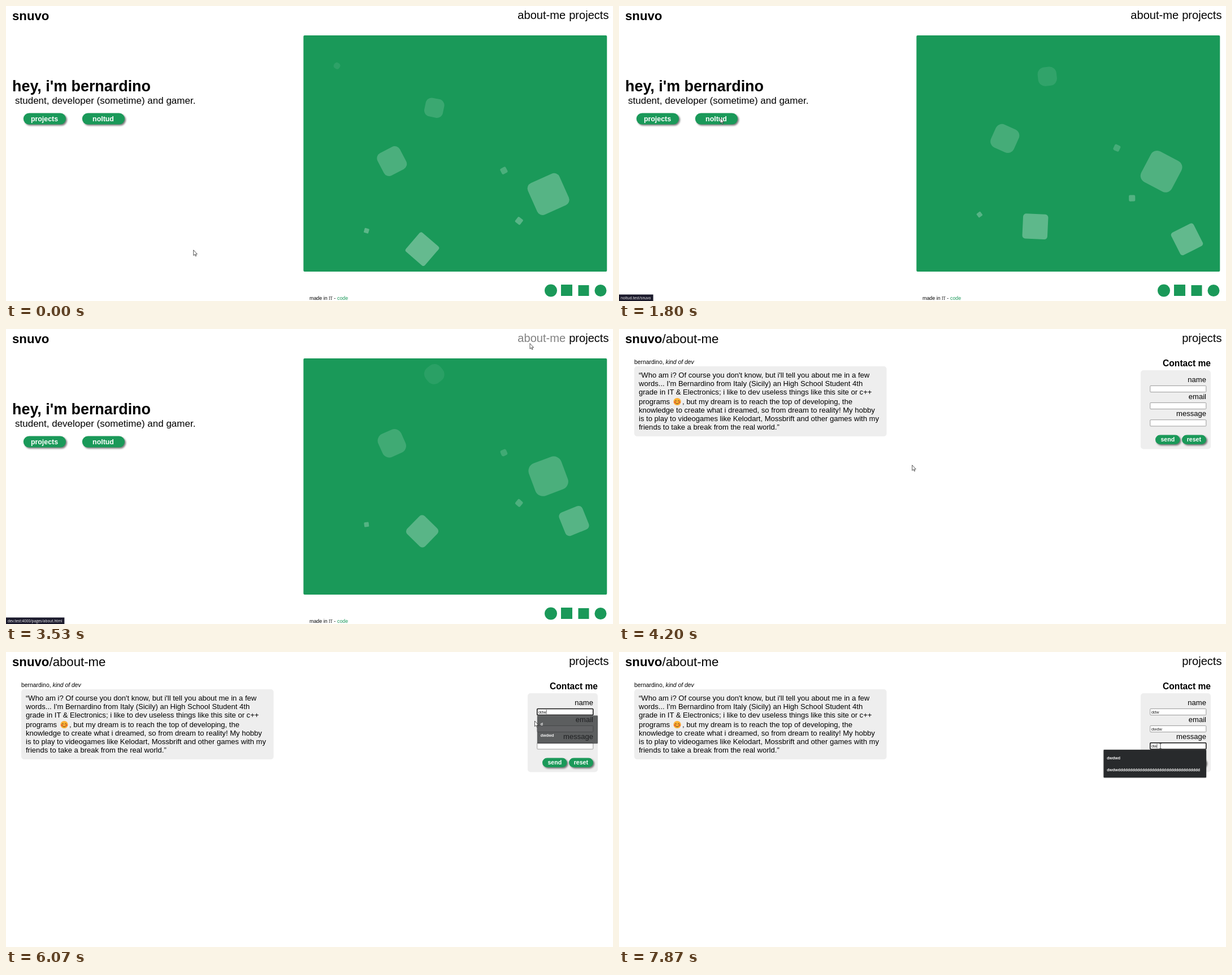
Write an HTML page that moves like this. It is 1074 px wide and 522 px high and loops after 8000 ms.

```html
<!DOCTYPE html>
<html lang="en">
<head>
<meta charset="utf-8">
<title>snuvo</title>
<style>
  html, body { margin: 0; width: 100%; height: 100%; overflow: hidden; background: #fff; }
  svg { display: block; }
  text { font-family: "Liberation Sans", Arial, sans-serif; }
  .b { font-weight: bold; }
  .end { text-anchor: end; }
  .nav { font-size: 20.1px; }
  .logo { font-size: 22.2px; }
  .body { font-size: 13.05px; }
  .foot { font-size: 8.9px; }
  .pill rect { fill: #1a9959; filter: drop-shadow(2.8px 2.8px 1.6px #0008); }
  .pill text { fill: #fff; font-weight: bold; text-anchor: middle; }
  .green { fill: #1a9959; }
  .value { font-size: 7.4px; fill: #222; }
  .option { font-size: 7px; font-weight: bold; fill: #f2f2f2; }
  .status { font: 6.5px "Open Sans", sans-serif; fill: #fff; }
</style>
</head>
<body>
<svg width="1074" height="522" viewBox="0 0 1074 522">
  <text class="logo b" x="11" y="25">snuvo</text>
  <text class="nav end" x="1066.5" y="23">projects</text>

  <g id="home">
    <text id="aboutLink" class="nav" x="905.3" y="23">about-me</text>
    <text class="b" x="11" y="151" font-size="26.9">hey, i'm bernardino</text>
    <text x="16" y="173" font-size="17">student, developer (sometime) and gamer.</text>
    <g class="pill" font-size="12.4">
      <rect x="30.8" y="189.6" width="75.2" height="20" rx="10"/>
      <text x="68" y="204">projects</text>
      <rect x="134.8" y="189.6" width="75.2" height="20" rx="10"/>
      <text x="172" y="204">noltud</text>
    </g>
    <rect class="green" x="526.3" y="52" width="537" height="418" rx="2"/>
    <svg id="panel" x="526.3" y="52" width="537" height="418"></svg>
    <g class="green">
      <circle cx="964" cy="503.5" r="11"/>
      <rect x="982" y="493" width="20" height="20"/>
      <rect x="1012.5" y="494" width="19" height="19"/>
      <circle cx="1052" cy="503.5" r="10.5"/>
    </g>
    <text class="foot" x="537" y="519.5">made in</text>
    <text x="571" y="519.5" style="font: 7.2px 'Liberation Serif', serif">IT</text>
    <text class="foot" x="580.3" y="519.5">-</text>
    <text class="foot green" x="586" y="519.5">code</text>
    <g id="status">
      <rect id="statusBox" y="510.5" height="11.5" fill="#1b1a2c"/>
      <text id="statusText" class="status" x="3" y="518.6"></text>
    </g>
  </g>

  <g id="about">
    <text class="logo" x="76.5" y="25">/about-me</text>
    <text x="27" y="61.5" font-size="10.4">bernardino, <tspan font-style="italic">kind of dev</tspan></text>
    <rect x="27" y="66" width="446.5" height="124" rx="5" fill="#eee"/>
    <g class="body">
      <text x="35" y="85.5">“Who am i? Of course you don't know, but i'll tell you about me in a few</text>
      <text x="35" y="101">words... I'm Bernardino from Italy (Sicily) an High School Student 4th</text>
      <text x="35" y="116">grade in IT &amp; Electronics; i like to dev useless things like this site or c++</text>
      <text x="35" y="133">programs</text>
      <text x="112" y="133">, but my dream is to reach the top of developing, the</text>
      <text x="35" y="148">knowledge to create what i dreamed, so from dream to reality! My hobby</text>
      <text x="35" y="163">is to play to videogames like Kelodart, Mossbrift and other games with my</text>
      <text x="35" y="178">friends to take a break from the real world.”</text>
    </g>
    <g transform="translate(103 128.5)">
      <circle r="6.6" fill="#fbb034"/>
      <circle cx="-4.2" cy="1.2" r="1.7" fill="#f4692f"/>
      <circle cx="4.2" cy="1.2" r="1.7" fill="#f4692f"/>
      <path d="M-4-1q1.4-2.4 2.8 0M1.2-1q1.4-2.4 2.8 0M-3 2.2q3 3.4 6 0" fill="none" stroke="#5b3a1a" stroke-linecap="round"/>
    </g>

    <text class="b end" x="1047" y="66" font-size="15.6">Contact me</text>
    <rect x="923" y="73" width="124" height="139.5" rx="5" fill="#eee"/>
    <g class="body end">
      <text x="1039" y="93.5">name</text>
      <text x="1039" y="123.5">email</text>
      <text x="1039" y="153.5">message</text>
    </g>
    <g class="pill" font-size="10.6">
      <rect x="949" y="187.5" width="43.5" height="16.5" rx="8.25"/>
      <text x="970.8" y="199">send</text>
      <rect x="996" y="187.5" width="43" height="16.5" rx="8.25"/>
      <text x="1017.3" y="199">reset</text>
    </g>
    <g id="form"></g>
  </g>

  <path id="arrow" d="M0 0V9.6L2.2 7.7 3.7 10.9 5.1 10.3 3.7 7.2H6.6Z" fill="#fff" stroke="#111" stroke-width=".7"/>
  <path id="beam" d="M-2-4.5H2M0-4.5V4.5M-2 4.5H2" fill="none" stroke="#222" stroke-width=".8"/>
</svg>

<script>
const $ = id => document.getElementById(id);
const LOOP = 8000, SWITCH = 3670, SCALE = 0.556;

// left edge (share of panel), size, delay in s, duration in s
const squares = [
  [.25, 80, 0, 25], [.10, 20, 2, 12], [.70, 20, 4, 25],
  [.40, 60, 0, 18], [.65, 20, 0, 25], [.75, 110, 3, 25],
  [.35, 80, 7, 25], [.20, 15, 2, 35], [.85, 80, 0, 11]
];

// time, x, y of the pointer
const pointer = [
  [0, 332, 432], [870, 92, 276], [1200, 58.5, 254.5], [1400, 66, 200],
  [1750, 172, 199], [1950, 200, 195], [2470, 706, 67], [2600, 745, 58],
  [2980, 905, 24], [3270, 927, 25.5], [3600, 927, 25.5], [4200, 519, 241],
  [4300, 490, 222], [4530, 317, 120], [4800, 620, 52], [5000, 900, 72],
  [5130, 962, 105], [5700, 962, 105], [6000, 936, 121], [6070, 935.5, 122],
  [6200, 928.5, 128], [6400, 957, 136], [7050, 957, 136], [7230, 958, 166.5]
];

const statuses = [
  [1380, 1580, "dev.test:4000/pages/projects.html"],
  [1640, 2000, "noltud.test/snuvo"],
  [2990, SWITCH, "dev.test:4000/pages/about.html"]
];

const fields = [
  { y: 106, text: "ddw", keys: [5500, 5870, 6000], focus: 5100, blur: 6380,
    open: 5190, close: 6010, x: 940, w: 107,
    options: ["d", "dwdwd", "wdwd", "wd", "wdd", "w"] },
  { y: 136, text: "dwdw", keys: [6530, 6660, 6865, 6925], focus: 6380, blur: 7200,
    open: 6420, close: 7060, x: 940, w: 107,
    options: ["dwdwd", "d", "wd"] },
  { y: 166.3, text: "dw", keys: [7550, 7860], focus: 7200, blur: LOOP,
    open: 7270, close: LOOP, x: 857.5, w: 181.5,
    options: ["dwdwd", "dwdw" + "d".repeat(34), "d", "ddw"] }
];

const show = (id, on) => $(id).style.display = on ? "" : "none";

function pointerAt(t) {
  const i = pointer.findIndex(p => p[0] > t);
  if (i < 0) return pointer.at(-1).slice(1);
  const [t0, x0, y0] = pointer[i - 1], [t1, x1, y1] = pointer[i];
  const k = (t - t0) / (t1 - t0);
  return [x0 + (x1 - x0) * k, y0 + (y1 - y0) * k];
}

// the squares rise, spin, round off and fade; they stall before the page change
function drawSquares(t) {
  const now = 11.54 + Math.min(t, 3250) / 1000;
  $("panel").innerHTML = squares.map(([left, size, delay, duration]) => {
    const p = (now - delay) / duration % 1, s = size * SCALE;
    const x = left * 537 + s / 2, y = 418 + (150 - 1000 * p) * SCALE - s / 2;
    return `<rect x="${-s / 2}" y="${-s / 2}" width="${s}" height="${s}" rx="${p * s / 2}"
      fill="#fff" opacity="${.4 * (1 - p)}" transform="translate(${x} ${y}) rotate(${720 * p})"/>`;
  }).join("");
}

function drawHome(t) {
  drawSquares(t);
  $("aboutLink").style.fill = t > 2980 ? "#808080" : "#000";
  const status = statuses.find(([from, to]) => t >= from && t < to);
  show("status", status);
  if (status) {
    $("statusText").textContent = status[2];
    $("statusBox").setAttribute("width", $("statusText").getComputedTextLength() + 7);
  }
}

const typed = (f, t) => f.text.slice(0, f.keys.filter(k => k <= t).length);

function inputMarkup(f, t) {
  const value = typed(f, t), focused = t >= f.focus && t < f.blur;
  const caret = 942.5 + [...value].reduce((w, c) => w + (c === "w" ? 5.34 : 4.12), 0);
  return `<rect x="939.8" y="${f.y - 5.6}" width="99" height="11.2" rx="1.2" fill="#fff"
      stroke="${focused ? "#101010" : "#767676"}" stroke-width="${focused ? 1.5 : .7}"/>
    <text class="value" x="942" y="${f.y + 2.6}">${value}</text>` +
    (focused ? `<path d="M${caret} ${f.y - 4}v8" stroke="#000" stroke-width=".6"/>` : "");
}

function listMarkup(f, t) {
  const alpha = t < f.open ? 0 : Math.min(1, 1 - (t - f.close) / 230);
  if (alpha <= 0) return "";
  const value = typed(f, t), top = f.y + 6.6;
  const match = start => f.options.filter(o => o.startsWith(start));
  const exact = match(value), rows = exact.length ? exact : match(value[0]);
  return `<g opacity="${alpha}" style="filter: drop-shadow(0 .5px 1px #0006)">
    <rect x="${f.x}" y="${top}" width="${f.w}" height="${8.5 + 20.4 * rows.length}" rx="1" fill="#282a2c"/>` +
    rows.map((o, i) => `<text class="option" x="${f.x + 5.7}" y="${top + 17.2 + 20.4 * i}">${o}</text>`).join("") +
    "</g>";
}

function drawAbout(t) {
  $("form").innerHTML = fields.map(f => inputMarkup(f, t)).join("") +
    fields.map(f => listMarkup(f, t)).join("");
}

function render(t) {
  const home = t < SWITCH, [x, y] = pointerAt(t);
  show("home", home);
  show("about", !home);
  (home ? drawHome : drawAbout)(t);

  const overInput = !home && x > 940 && x < 1039 && fields.some(f => Math.abs(y - f.y) < 5.6);
  show("arrow", !overInput);
  show("beam", overInput);
  $(overInput ? "beam" : "arrow").setAttribute("transform", `translate(${x} ${y})`);
}

const start = performance.now();
function frame(now) {
  render(Math.max(0, now - start) % LOOP);
  requestAnimationFrame(frame);
}
frame(start);
</script>
</body>
</html>
```
